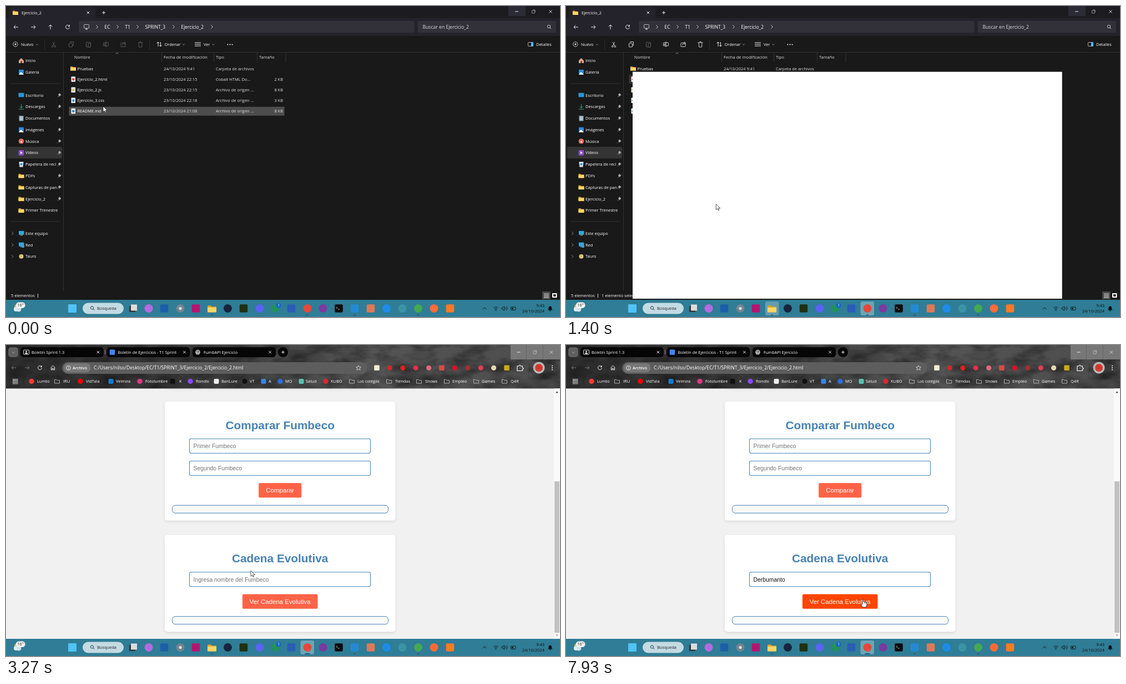
An HTML page that plays this animation: 998x561 px, repeating every 8000 ms.

```html
<!DOCTYPE html>
<html lang="es">
<head>
<meta charset="utf-8">
<title>Ejercicio_2</title>
<style>
html, body { margin: 0; width: 100%; height: 100%; overflow: hidden; background: #191919; }
svg { display: block; width: 998px; height: 561px; }
text { font-family: "Open Sans", "Noto Sans", sans-serif; white-space: pre; }
#page text { font-family: "Liberation Sans", Arial, sans-serif; }
.card { filter: drop-shadow(0 2px 2.6px rgba(0,0,0,.1)); }
</style>
</head>
<body>
<svg id="stage" viewBox="0 0 998 561"></svg>
<script>
// Drawing helpers: text is placed by the middle of its capitals
const text = (x, y, s, size = 7.45, fill = '#fff', more = '') =>
  `<text x="${x}" y="${y + size * .36}" font-size="${size}" fill="${fill}" ${more}>${s}</text>`;
const rect = (x, y, w, h, fill, r = 0, more = '') =>
  `<rect x="${x}" y="${y}" width="${w}" height="${h}" rx="${r}" fill="${fill}" ${more}/>`;
const dot = (x, y, r, fill, more = '') => `<circle cx="${x}" cy="${y}" r="${r}" fill="${fill}" ${more}/>`;
const box = (x, y, s, fill, r = 1) => rect(x - s / 2, y - s / 2, s, s, fill, r);
const line = (d, stroke = '#fff', w = .9) => `<path d="${d}" fill="none" stroke="${stroke}" stroke-width="${w}"/>`;
const group = (id, body, more = '') => `<g id="${id}" ${more}>${body}</g>`;
const cross = (x, y, r = 2.3, c) => line(`M${x - r} ${y - r}l${2 * r} ${2 * r}m0 ${-2 * r}l${-2 * r} ${2 * r}`, c);
const plus = (x, y, r = 3) => line(`M${x - r} ${y}h${2 * r}M${x} ${y - r}v${2 * r}`);
const chevron = (x, y, c = '#ddd') => line(`M${x - 1.5} ${y - 3}l3 3l-3 3`, c);
const down = (x, y, r = 1.8) => line(`M${x - r} ${y - r / 2}l${r} ${r}l${r} ${-r}`, '#ccc', .7);
const lens = (x, y, c = '#ddd') => dot(x, y, 2.6, 'none', `stroke="${c}" stroke-width=".9"`) + line(`M${x + 2} ${y + 2}l2.3 2.3`, c);
const folder = (x, y, k = 1) => `<g transform="translate(${x} ${y}) scale(${k})">` +
  `<path d="M-5-3.6h3.6l1.3 1.3H5V4H-5z" fill="#e0a126"/>` + rect(-5, -1.4, 10, 5.4, '#ffd766', .6) + '</g>';
const outlineFolder = (x, y) => line(`M${x - 4.5} ${y - 3.2}h3.2l1.3 1.4h4.5v5.4h-9z`, '#ccc', .8);
const back = (x, y, c) => line(`M${x + 4} ${y}h-8m3.3-3.3l-3.3 3.3l3.3 3.3`, c);
const forward = (x, y, c) => line(`M${x - 4} ${y}h8m-3.3-3.3l3.3 3.3l-3.3 3.3`, c);
const reload = (x, y) => line(`M${x + 3} ${y - 2}a3.5 3.5 0 1 0 .5 2.6M${x + 3.4} ${y - 4}v2.6h-2.6`);
const windowButtons = (x, y, step) => line(`M${x - 3} ${y}h6`) + rect(x + step - 3, y - 2, 5, 5, 'none', .8, 'stroke="#ccc" stroke-width=".7"') +
  line(`M${x + step - 1.5} ${y - 3}h4v4`, '#ccc', .6) + cross(x + 2 * step, y, 2.7, '#ddd');

// File explorer
function explorer() {
  let s = rect(0, 0, 998, 530, '#191919') + rect(0, 0, 998, 23, '#1b1b20') + rect(0, 22, 998, 32, '#24232b') +
    rect(5, 2, 156, 24, '#24232b', 4) + rect(905, 0, 31, 18, '#2b2b36') + folder(17, 12) +
    text(28, 12, 'Ejercicio_2') + cross(148, 12) + plus(176, 12) + windowButtons(920, 10, 30.5) +
    back(18, 38) + forward(49, 38) + line('M80 42v-8m-3.3 3.3l3.3-3.3l3.3 3.3') + reload(111, 38) +
    rect(131, 27, 605, 21, '#32313a', 2) + rect(742, 27, 249, 21, '#32313a', 2) +
    rect(140.5, 33.5, 9, 6.5, 'none', 1, 'stroke="#ddd" stroke-width=".8"') + line('M143 42h4M145 40v2') +
    [164, 201, 237, 302, 371].map(x => chevron(x, 37.5)).join('') +
    [[177.5, 'EC'], [214.5, 'T1'], [250.5, 'SPRINT_3'], [315.5, 'Ejercicio_2']].map(([x, n]) => text(x, 37.5, n, 8.4)).join('') +
    text(750.5, 38, 'Buscar en Ejercicio_2', 8.6, '#ddd') + lens(978, 37);
  s += line('M0 83.5H998', '#373737', .8) + dot(17, 69, 4.3, 'none', 'stroke="#ddd" stroke-width=".8"') + plus(17, 69, 2) +
    text(27, 69.5, 'Nuevo') + down(56, 69.5) + line('M69.5 60v19M258.5 60v19', '#303030') +
    group('tools', line('M84 65l4 7M88 65l-4 7', 'inherit') + dot(83.6, 73, 1.4, 'none') + dot(88.4, 73, 1.4, 'none') +
      rect(113.5, 67, 6, 7, 'none', 1) + line('M116 66v-1.5h5.5v6.5h-1.5', 'inherit') +
      rect(175.5, 66, 9, 6, 'none', 1) + line('M180 64v10M177 71l1.2-3.4l1.2 3.4', 'inherit') +
      rect(207, 66.5, 8, 7, 'none', 1) + line('M210 71q0-4 5-4m-2-2.5l2.5 2.5l-2.5 2.5', 'inherit') +
      line('M237.5 66h9M239 66l.6 8h5l.6-8M240.5 66q0-1.8 1.6-1.8q1.6 0 1.6 1.8', 'inherit'), 'stroke-width=".9"') +
    rect(144.5, 65.5, 8, 8.5, 'none', 1, 'stroke="#5c5c5c"') + rect(148, 68, 4.5, 6, '#191919', .5, 'stroke="#5c5c5c"') +
    line('M274 73v-8m-2.3 2.3l2.3-2.3l2.3 2.3M278.5 65v8m-2.3-2.3l2.3 2.3l2.3-2.3') + text(285.5, 69.5, 'Ordenar') + down(320, 69.5) +
    line('M340 66h11m-11 3h11m-11 3h11') + text(356, 69.5, 'Ver') + down(373.5, 69.5) +
    [399.5, 403.5, 407.5].map(x => dot(x, 69.5, 1, '#fff')).join('') +
    rect(940.5, 65.5, 9, 7, 'none', 1, 'stroke="#ddd" stroke-width=".8"') + rect(946, 65.5, 4, 7, '#4cc2ff', 1) + text(955, 69.5, 'Detalles');
  s += line('M103.5 84V514M280.5 84v17M374.5 84v17M452.5 84v17M504 84v17', '#3a3a3a', .8) + line('M8 140H96M8 389H96', '#3c3c3c', .8) +
    [[123, 'Nombre'], [284, 'Fecha de modificación', 7.6], [378, 'Tipo'], [456, 'Tamaño']].map(([x, n, k]) => text(x, 92, n, k, '#ddd')).join('') +
    line('M197.5 86.5l2.5-2l2.5 2', '#aaa', .7) + rect(113.5, 0, 388, 16, '#4d4d4d', 0, 'id="row"');
  const files = [['Pruebas', '24/10/2024 9:41', 'Carpeta de archivos', '', ''],
    ['Ejercicio_2.html', '23/10/2024 22:15', 'Cobalt HTML Do...', '2 KB', '#db4437'],
    ['Ejercicio_2.js', '23/10/2024 22:15', 'Archivo de origen ...', '8 KB', '#c9b84a'],
    ['Ejercicio_3.css', '23/10/2024 22:18', 'Archivo de origen ...', '3 KB', '#3f8ecb'],
    ['README.md', '23/10/2024 21:08', 'Archivo de origen ...', '8 KB', '#3a78b0']];
  files.forEach(([name, date, type, size, tint], i) => {
    const y = 113 + 19.2 * i;
    s += (tint ? rect(117.5, y - 5, 7.5, 9.5, '#f2f2f2', .6) + dot(121.3, y, 2.3, tint) : folder(121, y - .5)) +
      text(128.5, y, name) + text(284, y, date, 7.45, '#ddd') + text(378, y, type, 7.45, '#ddd') + text(499, y, size, 7.45, '#ddd', 'text-anchor="end"');
  });
  s += rect(2, 254, 99, 21, '#343434', 2);
  const picture = y => box(27.5, y, 9, '#2b88d8') + `<path d="M23 ${y + 4.5}l4-5l5 5z" fill="#fff"/>`;
  const screen = y => rect(23, y - 4.5, 9.5, 7, '#35a5dc', .6) + rect(25.5, y + 3, 4.5, 1, '#9ab');
  const icons = [
    y => `<path d="M23 ${y}l4.5-4.5l4.5 4.5v4.5h-9z" fill="#e8a58c"/>` + rect(26.5, y + 1, 2.5, 3.5, '#444'), picture, 0,
    y => rect(22.5, y - 4, 10, 7.5, '#2596d8', .6), y => line(`M27.5 ${y - 4.5}v7m-3-3l3 3l3-3M23 ${y + 4.5}h9`, '#3fb489'),
    y => rect(23.5, y - 4.5, 8, 9.5, '#90a4b5', .6) + line(`M25 ${y - 1.5}h5m-5 2h5m-5 2h5`, '#fff', .7), picture,
    y => dot(27.5, y, 4.8, '#e0705a') + dot(27.5, y + 1, 1.4, '#fff'),
    y => box(27.5, y, 9.5, '#8e4bd0') + `<path d="M26 ${y - 2.5}l4 2.5l-4 2.5z" fill="#fff"/>`,
    y => `<path d="M23.5 ${y - 4.5}h8l-1 9.5h-6z" fill="#dfe9ef"/>` + dot(27.5, y, 2, '#2b88d8'),
    ...Array(4).fill(y => folder(27.5, y)), 0, screen, y => screen(y) + dot(30.5, y + 2.5, 2.6, '#3fa3d8'), y => dot(27.5, y, 4, '#d9c27a')];
  const places = ['Inicio', 'Galería', '', 'Escritorio', 'Descargas', 'Documentos', 'Imágenes', 'Música', 'Vídeos', 'Papelera de reci',
    'PDFs', 'Capturas de pan', 'Ejercicio_2', 'Primer Trimestre', '', 'Este equipo', 'Red', 'Tauro'];
  places.forEach((name, i) => {
    const y = 98.5 + 20.78 * i;
    if (!name) return;
    s += icons[i](y) + text(35, y, name);
    if (i > 2 && i < 13) s += line(`M93 ${y + 3.5}l2.3-2.3`, '#aaa', .8) + `<path d="M94 ${y - 1}l2.5-2.5l3 3l-2.5 2.5q-1 1-3-3z" fill="#aaa"/>`;
    if (i > 14) s += chevron(11.5, y, '#888');
  });
  return s + text(9, 522.5, '5 elementos') + line('M57.5 519v7') +
    group('status', text(64, 522.5, '1 elemento seleccionado  1,58 KB') + line('M186.5 519v7')) +
    rect(966, 515, 14.5, 14, '#4a4a4a') + line('M969 519h9m-9 2.5h9m-9 2.5h9m-9 2h9', '#fff', .8) + rect(984, 518, 8.5, 8, '#fff') + rect(986, 520, 4.5, 4, '#222');
}

// Browser window
function browser() {
  const tab = (x, title, icon) => rect(x, 4, 149.5, 18, '#060606', 5) + icon + text(x + 20, 13, title, 7.4) + cross(x + 140, 13);
  let s = rect(0, 0, 998, 79, 'url(#theme)') + rect(0, 0, 998, 79, '#000', 0, 'filter="url(#grain)"') + rect(909, 0, 89, 26, '#777') +
    line('M937.5 0v26M967.5 0v26', '#5c5c5c', .7) + windowButtons(923.5, 13, 29.5) + rect(4, 4, 18, 18, '#5f5f5f', 5) + down(13, 13.5, 2.3) +
    tab(26, 'Boletín Sprint 1.3', rect(31.5, 9, 10, 8, 'none', 1, 'stroke="#ddd"') + dot(36.5, 12, 1.4, '#ddd') + rect(34, 14, 5, 2, '#ddd')) +
    tab(181.5, 'Boletín de Ejercicios - T1 Sprint', box(191.5, 13, 9.5, '#4285f4')) + line('M178.5 9v8', '#bbb', .7) +
    rect(336, 4, 0, 18, '#060606', 5, 'id="newTab"') +
    group('tabTitle', dot(345.5, 13, 4.5, '#aaa') + line('M342 11h6l-3 4', '#444', .8) + text(356, 13, 'FumbAPI Ejercicio', 7.4) + cross(475.5, 13)) +
    group('addTab', dot(0, 13, 9, '#060606') + plus(0, 13)) + back(14, 41, '#858585') + forward(38, 41, '#858585') +
    group('stop', cross(61, 41, 2.8)) + group('reload', reload(61, 41)) + line('M80.5 41l4-3.8l4 3.8M81.5 40.5v4.5h2v-3h2v3h2v-4.5') +
    rect(101, 31, 550, 21, '#5d5d5d', 10.5) + rect(104, 33, 48.5, 16.5, '#777', 8) + dot(112.5, 41.3, 3.8, 'none', 'stroke="#fff" stroke-width=".8"') +
    line('M112.5 40.5v3M112.5 38.8v1') + text(120, 41.3, 'Archivo', 7.2, '#fff', 'font-weight="600"') +
    text(158, 41.3, 'C:/Users/nilso/Desktop/EC/T1/SPRINT_3/Ejercicio_2/Ejercicio_2.html', 8.62) +
    line('M635 36.8l1.3 3h3.2l-2.5 2.2l1 3.3l-3-1.9l-3 1.9l1-3.3l-2.5-2.2h3.2z', '#ddd', .8);
  ['#f5f1d5', '#d8232a', '#e02020', '#e8304a', '#e06a7c', '#d8484a', '#e01020', '#a03030', '#e03c50', '#e8d8b0', '#c9a81c']
    .forEach((c, i) => s += i % 5 ? dot(668 + 23.4 * i, 41.3, 4.6, c) : box(668 + 23.4 * i, 41.3, 9.5, c));
  s += line('M921 38h3q0-2 1.6-2q1.6 0 1.6 2h3v3q2 0 2 1.5q0 1.5-2 1.5v2.5h-9.2z', '#fff', 1.1) + line('M943 33v16', '#222', 1) +
    dot(960, 41, 10.5, '#b9b9b9') + dot(960, 41, 7, '#cf3a32') + [37.5, 41, 44.5].map(y => dot(984, y, 1, '#fff')).join('');
  for (let i = 0; i < 9; i++) s += rect(12.5 + i % 3 * 3.2, 61.5 + (i / 3 | 0) * 3.2, 2.2, 2.2, 'none', 0, 'stroke="#ddd" stroke-width=".6"');
  s += line('M32 58v14', '#222', 1);
  const marks = [[46, 56, 'Lumto', '#e94235'], [92, 103, 'IRU'], [134, 144, 'VidTala', '#f00'], [189, 198, 'Velmira', '#1a7bd0'], [241, 251, 'Fotolumbre', '#e03a80'],
    [300, 312, 'K', '#111'], [332, 342, 'Rondix', '#9146ff'], [379, 388, 'BanLure', '#eee'], [430, 439, 'VT', '#111'], [464, 473, 'A', '#3b82e0'],
    [494, 503, 'MO', '#2f6be0'], [532, 540, 'Salud', '#5cc0b0'], [576, 585, 'KUBO', '#d9272e'], [623, 633, 'Los colegas'], [690, 701, 'Tiendas'],
    [744, 755, 'Shows'], [794, 804, 'Empleo'], [847, 857, 'Games'], [898, 909, 'Q4R']];
  marks.forEach(([ix, x, name, c], i) => s += (!c ? outlineFolder(ix, 65.5) : i % 2 ? box(ix, 65.5, 9, c, 2) : dot(ix, 65.5, 4.7, c)) + text(x, 65.5, name));
  return s + rect(0, 78.5, 998, 451.5, '#fff', 0, 'id="paper"') + `<g clip-path="url(#view)">${group('page', page())}</g>` +
    group('bar', rect(987, 78.5, 11, 451.5, '#fafafa') + `<path d="M990 86.5h5l-2.5-3z" fill="#444"/><path id="barEnd" d="M990 522.5h5l-2.5 3z"/>` +
      rect(988, 90, 9, 273, '#c1c1c1', 0, 'id="thumb"'));
}

function page() {
  const mid = 493.7, centred = 'text-anchor="middle"', steel = '#4682b4';
  const card = (y, title, fields, label, w, id) => {
    const end = y + 26.5 + 40 * fields.length;
    return rect(286, y, 415.5, 134.5 + 40 * fields.length, '#fff', 5, 'class="card"') + text(mid, y + 42, title, 20.8, steel, centred + ' font-weight="bold"') +
      fields.map((f, i) => rect(330.5, y + 67 + 40 * i, 326, 26, '#fff', 2.6, `stroke="${steel}" stroke-width="1.04" id="${id}field${i}"`) +
        text(337.5, y + 80.2 + 40 * i, f, 10.4, '#757575', `id="${id}text${i}"`)).join('') +
      rect(mid - w / 2, end + 40.3, w, 26.3, '#ff6347', 2.6, `id="${id}button"`) + text(mid, end + 53.3, label, 11.44, '#fff', centred) +
      rect(299.5, end + 80.5, 389, 14, '#f9f9f9', 5.5, `stroke="${steel}"`);
  };
  return text(mid, 121, 'FumbAPI Ejercicio', 26, steel, centred + ' font-weight="bold"') +
    card(160.5, 'Buscar Fumbeco', ['Ingresa nombre del Fumbeco'], 'Buscar Fumbeco', 113, 'a') +
    card(360.5, 'Comparar Fumbeco', ['Primer Fumbeco', 'Segundo Fumbeco'], 'Comparar', 77, 'b') +
    card(601, 'Cadena Evolutiva', ['Ingresa nombre del Fumbeco'], 'Ver Cadena Evolutiva', 135.5, 'c') + rect(0, 675, .8, 11.5, '#000', 0, 'id="caret"');
}

function taskbar() {
  let s = rect(0, 530, 998, 31, '#2f7d96') + group('glowFiles', rect(359, 533, 24.5, 25, '#fff', 3, 'opacity=".25"')) +
    group('glowWeb', rect(530.5, 533, 24.5, 25, '#fff', 3, 'opacity=".3"')) +
    dot(20, 543, 5, '#f7b733') + dot(18, 547, 4, '#e8eef5') + dot(23, 547, 4.5, '#d5e1ee') + rect(18, 534.5, 16.5, 10.5, '#f3f3f3', 5) + text(20.5, 539.8, '16°', 7.2, '#222') +
    box(119.5, 545.5, 15, '#4fc3f7') + rect(138, 535.5, 74, 20, '#c3dbe3', 10) + lens(155, 544.5, '#222') + text(164, 545.5, 'Búsqueda', 7.45, '#222') +
    rect(222, 541, 11, 11, '#333') + rect(225, 538.5, 11, 11, '#ddd') + folder(371, 546, 1.6);
  const apps = [[257, '#b26be0'], [285, '#1d5fa8', 1], [314, '#76838f'], [342, '#b5156f', 1], [399.5, '#17243f'], [428, '#203012', 1], [457, '#5865f2'],
    [485.5, '#23905f'], [514, '#2a5db8', 1], [543, '#e3483a'], [571, '#7a3aa0'], [599.5, '#0c0c0c', 1], [628, '#2489d3', 1], [657, '#dc7a58', 1],
    [685.5, '#1d8ce8'], [714, '#3b94a4'], [742.5, '#43a854'], [771, '#ff6c37'], [800, '#fb7a24', 1]];
  apps.forEach(([x, c, square]) => s += square ? box(x, 545.5, 14.5, c, 2) : dot(x, 545.5, 7.5, c));
  return s + dot(314, 545.5, 2.6, '#d7e4ec') + line('M595 543l2 1.5l-2 1.5m3 1h3', '#fff', .7) + dot(491, 540, 4.8, '#1769c4') + text(491, 540, '1', 6.5, '#fff', 'text-anchor="middle"') +
    [371, 543, 628, 742.5].map(x => rect(x - 2, 556.5, 4, 1.3, '#444', .6)).join('') + rect(538, 556.3, 10, 1.5, '#14567f', .7, 'id="active"') +
    line('M858.5 547l3.5-3l3.5 3', '#111') + line('M878.5 544.5q4-3.5 8 0M880 546.5q2.5-2 5 0', '#111') + dot(882.5, 548.5, 1, '#111') +
    line('M893.5 544h1.5l2.5-2.3v7.6l-2.5-2.3h-1.5zM899.5 543.5q1.5 2 0 4M901.5 542q3 3.5 0 7', '#111', .8) +
    rect(909.5, 543, 8.5, 5.5, 'none', 1, 'stroke="#111" stroke-width=".9"') + rect(911, 544.5, 3, 2.5, '#111') +
    text(970, 540, '9:43', 7.5, '#111', 'text-anchor="end"') + text(970, 550, '24/10/2024', 7.6, '#111', 'text-anchor="end"') +
    `<path d="M976 548.5q1.5-1 1.5-3.5q0-3.5 2.7-3.5q2.8 0 2.8 3.5q0 2.5 1.5 3.5z" fill="#111"/>` + rect(979, 549, 2.5, 1.3, '#111');
}

const pointers = group('arrow', '<path d="M0 0V10.3L2.5 8L4.1 11.6L5.7 10.9L4.2 7.4H7.4Z" fill="#fff" stroke="#111" stroke-width=".7"/>') +
  group('beam', line('M-2-5h1.5l.5.7l.5-.7h1.5M0-4.5v9M-2 5h1.5l.5-.7l.5.7h1.5', '#111', 1)) +
  group('hand', '<path d="M-1 .5Q0-.5 1 .5V5l5 1.2Q7 6.6 7 7.5V11L5.5 15H-.5L-3.5 10.5Q-4 8.5-1 10Z" fill="#fff" stroke="#111" stroke-width=".8"/>' + line('M3 6v2.5M5 6.5v2.5', '#111', .6));

document.getElementById('stage').innerHTML = `<defs>
  <linearGradient id="theme"><stop stop-color="#323232"/><stop offset=".35" stop-color="#393939"/><stop offset=".65" stop-color="#555"/><stop offset="1" stop-color="#4c4c4c"/></linearGradient>
  <filter id="grain" x="0" y="0" width="1" height="1" color-interpolation-filters="sRGB"><feTurbulence type="fractalNoise" baseFrequency=".02 .04" numOctaves="5"/>
    <feColorMatrix values="0 0 0 0 .08  0 0 0 0 .08  0 0 0 0 .08  1.4 0 0 0 -.5"/></filter>
  <clipPath id="view">${rect(0, 78.5, 987, 451.5, '#000')}</clipPath></defs>` +
  explorer() + group('browser', browser()) + rect(0, 0, 0, 0, '#fff', 0, 'id="opening"') + taskbar() + group('pointer', pointers);

// Motion
const el = id => document.getElementById(id);
const set = (id, attrs) => { for (const k in attrs) el(id).setAttribute(k, attrs[k]); };
const show = (id, on) => el(id).style.display = on ? '' : 'none';
const clamp = v => Math.max(0, Math.min(1, v));
const path = (keys, t) => {
  let i = 0;
  while (i < keys.length - 2 && t >= keys[i + 1][0]) i++;
  const [a, b] = [keys[i], keys[i + 1]], p = clamp((t - a[0]) / (b[0] - a[0]));
  return a.slice(1).map((v, j) => v + (b[j + 1] - v) * p);
};
const route = [[0, 175, 181], [70, 174, 179], [470, 150, 128], [800, 150, 128], [1330, 264, 350], [1530, 282, 371], [1670, 303, 352], [2000, 436, 276],
  [2400, 436, 276], [2870, 450, 340], [3270, 441, 407], [3530, 447, 418], [6600, 447, 418], [7070, 475, 457], [7800, 475, 457], [7930, 535, 458]];
const scrolling = [[2070, 0], [2270, 198.5], [2330, 258.3]];
const word = 'Derbumanto', keyTimes = [4600, 4730, 4870, 5070, 5330, 5400, 5470, 5870, 6000, 6130];
const within = (v, a, b) => v >= a && v <= b;

function draw(t) {
  const [x, y] = path(route, t), [scroll] = path(scrolling, t);
  const picked = t >= 870, open = t >= 1460, loaded = t >= 1660;
  const row = Math.max(1, Math.min(4, Math.round((y - 109) / 19.2)));
  set('row', { y: 105 + 19.2 * (picked ? 1 : row), fill: picked && t > 1000 ? '#333' : '#4d4d4d' });
  set('tools', { stroke: picked ? '#ddd' : '#5c5c5c' });
  show('status', picked);

  // The window grows out of its taskbar button
  const p = clamp((t - 1200) / 258);
  show('opening', p > 0 && !open);
  set('opening', { x: 534 * (1 - p), y: 528 * (1 - p), width: 998 * p, height: 528 * p });
  show('browser', open);
  show('glowFiles', within(t, 1200, 1460));
  show('glowWeb', t >= 1200);
  show('active', open);

  const grow = clamp((t - 1530) / 140), add = 344 + 155 * (1 - (1 - grow) ** 2);
  set('newTab', { width: Math.max(0, add - 349) });
  set('addTab', { transform: `translate(${add})` });
  show('tabTitle', t >= 1730);
  show('stop', !loaded);
  show('reload', loaded);
  show('page', loaded);
  show('bar', loaded);
  set('paper', { fill: loaded ? '#f1f1f1' : '#fff' });
  set('page', { transform: `translate(0 ${-scroll})` });
  set('thumb', { y: 90 + scroll * .604 });
  set('barEnd', { fill: scroll > 258 ? '#aaa' : '#444' });

  const typed = word.slice(0, keyTimes.filter(k => t >= k).length), focus = within(t, 3470, 7060);
  el('ctext0').textContent = typed || 'Ingresa nombre del Fumbeco';
  set('ctext0', { fill: typed ? '#111' : '#757575' });
  set('cfield0', { stroke: focus ? '#101010' : '#4682b4', 'stroke-width': focus ? 1.5 : 1.04 });
  show('caret', focus && !within(t, 4000, 4520) && t < 6630);
  if (open) set('caret', { x: 337.8 + (typed ? el('ctext0').getComputedTextLength() : 0) });

  const beam = t > 2330 && within(x, 330, 657) && within(y, 410, 436);
  const hand = t > 2330 && within(x, 426, 561) && within(y, 449, 476);
  set('cbutton', { fill: hand ? '#ff4500' : '#ff6347' });
  show('beam', beam);
  show('hand', hand);
  show('arrow', !beam && !hand);
  set('pointer', { transform: `translate(${x} ${y})` });
}

// The screen refreshes 15 times a second
const start = performance.now();
function tick() {
  const t = (performance.now() - start) % 8000;
  draw(Math.round(Math.floor((t + 5) * .015) / .15) * 10);
  requestAnimationFrame(tick);
}
tick();
</script>
</body>
</html>
```
